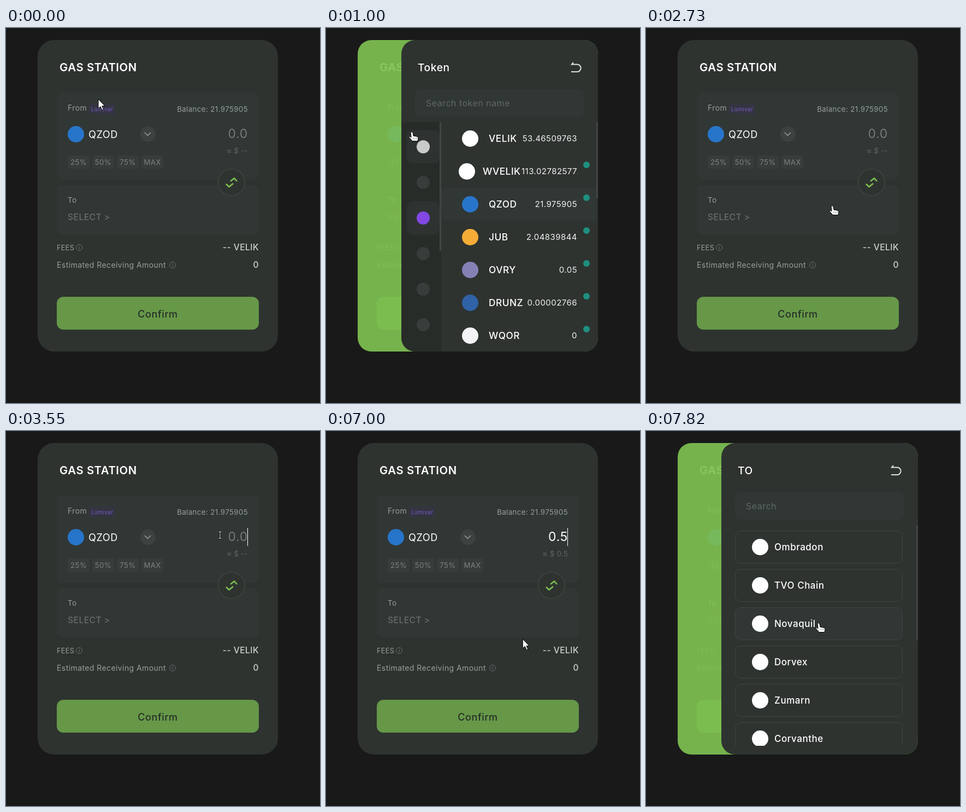
Recreate the animation shown at these times as an HTML page with a canvas. Size 575 px wide and 685 px high, loop 8 s.

```html
<!DOCTYPE html>
<html lang="en">
<head>
<meta charset="utf-8">
<title>Gas station</title>
<style>
html, body { margin: 0; width: 100%; height: 100%; overflow: hidden; background: #191919; }
canvas { display: block; }
</style>
</head>
<body>
<canvas id="stage" width="575" height="685"></canvas>
<script>
const ctx = document.getElementById('stage').getContext('2d');
const LOOP = 8000, FPMS = 11 / 1000, SLIDE = 540, PANEL_RADIUS = 25;
const CARD = '#2e3330', INNER = '#313735', LINE = '#3f4542', BAR = '#414644';
const MUTED = '#969f9b', DIM = '#666d6a', LIME = '#7fc150', WHITE = '#fff', BLUE = '#2775ca';

const tokens = [
  ['VELIK', '53.46509763', WHITE],
  ['WVELIK', '113.02782577', WHITE],
  ['QZOD', '21.975905', BLUE],
  ['JUB', '2.04839844', '#f5ac37'],
  ['OVRY', '0.05', '#8581b5'],
  ['DRUNZ', '0.00002766', '#2f62a6'],
  ['WQOR', '0', '#f4f4f6']
];
const chains = ['Ombradon', 'TVO Chain', 'Novaquil', 'Dorvex', 'Zumarn', 'Corvanthe'];

// Pointer stops: time, x, y
const stops = [
  [30, 169, 130], [450, 157, 190], [1120, 157, 190], [1820, 341, 325],
  [2950, 341, 325], [3180, 377, 200], [3280, 377, 200], [3360, 392, 190],
  [5860, 392, 190], [5909, 401, 206], [6270, 420, 419], [6560, 420, 419], [7360, 316, 351]
];
const caretOn = [[3540, 4080], [4170, 5080], [5540, 6080], [6610, 7140]];
const typing = [[4440, '0.5'], [4260, '0.'], [4170, '0']];

const clamp = v => Math.max(0, Math.min(1, v));
const inside = (x, y, l, t, r, b) => x >= l && x <= r && y >= t && y <= b;

// cubic-bezier(.25, .1, .25, 1)
function ease(v) {
  const x = clamp(v);
  const bez = (s, a, b) => 3 * s * (1 - s) ** 2 * a + 3 * s * s * (1 - s) * b + s ** 3;
  let lo = 0, hi = 1;
  for (let i = 0; i < 24; i++) {
    const mid = (lo + hi) / 2;
    if (bez(mid, .25, .25) < x) lo = mid; else hi = mid;
  }
  return bez(hi, .1, 1);
}

function box(x, y, w, h, r, fill, stroke) {
  ctx.beginPath();
  ctx.roundRect(x, y, w, h, r);
  if (fill) { ctx.fillStyle = fill; ctx.fill(); }
  if (stroke) { ctx.strokeStyle = stroke; ctx.lineWidth = 1; ctx.stroke(); }
}

function disc(x, y, r, fill) {
  ctx.beginPath();
  ctx.arc(x, y, r, 0, Math.PI * 2);
  ctx.fillStyle = fill;
  ctx.fill();
}

// y is the middle of the capital letters
function label(str, x, y, size, color, weight = 400, align = 'left') {
  ctx.font = `${weight} ${size}px Inter, sans-serif`;
  ctx.letterSpacing = size * .03 + 'px';
  ctx.textAlign = align;
  ctx.fillStyle = color;
  ctx.fillText(str, x, y + size * .364);
}

function tracePoly(points) {
  ctx.beginPath();
  points.forEach(([x, y]) => ctx.lineTo(x, y));
}

function line(points, color, width) {
  tracePoly(points);
  ctx.strokeStyle = color;
  ctx.lineWidth = width;
  ctx.stroke();
}

function info(x, y) {
  ctx.beginPath();
  ctx.arc(x, y, 5.5, 0, Math.PI * 2);
  ctx.strokeStyle = DIM;
  ctx.lineWidth = 1;
  ctx.stroke();
  line([[x, y - 1], [x, y + 3]], DIM, 1.2);
  line([[x, y - 3.2], [x, y - 2]], DIM, 1.2);
}

function drawForm(t) {
  box(58, 22, 440, 569, 30, CARD);
  label('GAS STATION', 98, 72, 20.3, WHITE, 600);

  box(93, 118, 370, 159, 10, INNER);
  label('From', 113, 146, 14, MUTED);
  box(152, 138, 48, 20, 4, '#343541');
  label('Lumivar', 176, 148, 10.2, '#7658c4', 400, 'center');
  label('Balance: 21.975905', 443, 148, 13.3, MUTED, 400, 'right');
  disc(128, 194, 15, BLUE);
  label('QZOD', 151, 194, 18.2, WHITE);
  disc(260, 194, 14, '#3d4240');
  line([[254, 191], [259.5, 196.5], [265, 191]], '#aab0ad', 1.2);
  ['25%', '50%', '75%', 'MAX'].forEach((s, i) => {
    box(113 + 45 * i, 233, 40, 24, 4, '#383d3c');
    label(s, 133 + 45 * i, 245, 13.2, '#7b8380', 400, 'center');
  });

  const typed = typing.find(([at]) => t >= at);
  const value = typed ? typed[1] : '';
  label(value || '0.0', 443, 193, 23, value ? WHITE : '#757875', 400, 'right');
  label('≈ $ ' + (value ? parseFloat(value) : '--'), 443, 224, 13, '#606764', 400, 'right');
  if (caretOn.some(([a, b]) => t >= a && t < b)) {
    ctx.fillStyle = WHITE;
    ctx.fillRect(442, 177, 1, 33);
  }

  box(93, 287, 370, 90, 10, INNER);
  label('To', 113, 314, 13.6, MUTED);
  label('SELECT >', 113, 345, 15.6, DIM, 500);

  disc(413, 282, 25, LINE);
  disc(413, 282, 23.5, CARD);
  line([[411, 280], [418, 274.5], [423, 280]], LIME, 2.6);
  line([[403, 285], [408.5, 290], [416, 284]], LIME, 2.6);

  label('FEES', 93, 401, 12.6, MUTED);
  info(134, 401);
  label('-- VELIK', 463, 400.5, 15.5, '#cdd5d1', 500, 'right');
  label('Estimated Receiving Amount', 93, 433, 14, MUTED);
  info(305, 433);
  label('0', 463, 432.5, 15.5, '#cdd5d1', 500, 'right');

  box(93, 491, 370, 60, 12, '#669848');
  label('Confirm', 278, 522, 18, '#262c27', 500, 'center');
}

function drawTokens(px, py) {
  box(138, 172, 73, 419, [0, 0, 0, PANEL_RADIUS], '#282c29');
  for (let i = 0; i < 6; i++) {
    const y = 217 + 65 * i;
    const hover = inside(px, py, 148, y - 30, 208, y + 30);
    const chosen = i === 2;
    if (hover || chosen) box(148, y - 30, 60, 60, 10, '#2e3331');
    disc(178, y, 12, chosen ? '#8247e5' : hover ? '#c9cbca' : '#383d3b');
  }
  box(208, 172, 3, 235, 0, BAR);

  box(211, 292, 284, 60, 0, INNER);
  tokens.forEach(([name, amount, color], i) => {
    const y = 202 + 60 * i, wide = name.length > 5;
    disc(wide ? 258 : 264, y, 15, color);
    label(name, wide ? 287 : 298, y, 17.3, WHITE, 500);
    label(amount, 460, y - .5, 15, '#f0f2f1', 400, 'right');
    if (i) disc(477, y - 12, 6, '#1f8f80');
  });
  box(495, 172, 3, 140, 0, BAR);
}

function drawChains(px, py) {
  ctx.save();
  ctx.beginPath();
  ctx.rect(138, 172, 360, 403);
  ctx.clip();
  chains.forEach((name, i) => {
    const y = 182 + 70 * i;
    const hover = inside(px, py, 163, y, 470, y + 60);
    box(163.5, y + .5, 306, 59, 10, hover ? INNER : null, LINE);
    disc(209, y + 30, 15, WHITE);
    label(name, 235, y + 30, 17, WHITE, 500);
  });
  ctx.restore();
  box(495, 172, 3, 210, 0, BAR);
}

function drawPanel(offset, title, hint, content, px, py) {
  if (offset >= SLIDE) return;
  ctx.save();
  ctx.translate(offset, 0);
  box(58, 22, 440, 569, PANEL_RADIUS, 'rgba(127,193,80,.9)');
  box(138, 22, 360, 569, PANEL_RADIUS, CARD);
  label(title, 168, 72, 19.2, WHITE, 500);
  ctx.beginPath();
  ctx.moveTo(453, 63);
  ctx.lineTo(450, 66.5);
  ctx.lineTo(460, 66.5);
  ctx.arc(460, 73.2, 6.7, -Math.PI / 2, Math.PI / 2);
  ctx.lineTo(449, 79.9);
  ctx.strokeStyle = '#dfe3e0';
  ctx.lineWidth = 2;
  ctx.stroke();
  box(163, 112, 310, 50, 10, INNER);
  label(hint, 183, 137, 16, '#5f6865');
  content(px - offset, py);
  ctx.restore();
}

function pointerAt(t) {
  const next = stops.findIndex(s => s[0] > t);
  if (next === 0) return stops[0].slice(1);
  if (next < 0) return stops[stops.length - 1].slice(1);
  const [ta, xa, ya] = stops[next - 1], [tb, xb, yb] = stops[next];
  const u = (t - ta) / (tb - ta), k = u * u * (3 - 2 * u);
  return [xa + (xb - xa) * k, ya + (yb - ya) * k];
}

const arrow = [[0, 0], [0, 17], [4, 13.5], [7, 20], [9.5, 19], [6.8, 12.5], [12, 12.5]];
const hand = [[-2, 1], [0, -.5], [2, 1], [3, 7], [11, 8.5], [12, 11], [11, 16.5],
  [1, 16.5], [-5, 9.5], [-3.5, 8], [-1, 10]];

function drawPointer(x, y, panelOpen) {
  const overInput = !panelOpen && inside(x, y, 348, 178, 443, 211);
  const clickable = panelOpen || inside(x, y, 113, 179, 274, 209) ||
    inside(x, y, 93, 287, 463, 377) || Math.hypot(x - 413, y - 282) < 25;
  ctx.save();
  ctx.translate(x, y);
  ctx.lineJoin = 'round';
  if (overInput) {
    for (const [color, width] of [['#000', 3], [WHITE, 1]]) {
      line([[0, -6], [0, 6]], color, width);
      line([[-2.5, -6], [2.5, -6]], color, width);
      line([[-2.5, 6], [2.5, 6]], color, width);
    }
  } else {
    tracePoly(clickable ? hand : arrow);
    ctx.closePath();
    ctx.fillStyle = WHITE;
    ctx.fill();
    ctx.strokeStyle = '#000';
    ctx.lineWidth = 1;
    ctx.stroke();
    if (clickable) [3, 6, 9].forEach(dx => line([[dx, 10], [dx, 13]], '#555', .7));
  }
  ctx.restore();
}

function draw(now) {
  const step = Math.min(87, Math.floor((now % LOOP + 6) * FPMS));
  const t = step / FPMS;
  const [px, py] = pointerAt(t);
  const tokenX = SLIDE * (1 - ease((t - 735) / 265) + ease((t - 2425.7) / 400));
  const chainX = SLIDE * (1 - ease((t - 7362) / 400));

  ctx.fillStyle = '#191919';
  ctx.fillRect(0, 0, 575, 685);
  drawForm(t);
  drawPanel(tokenX, 'Token', 'Search token name', drawTokens, px, py);
  drawPanel(chainX, 'TO', 'Search', drawChains, px, py);
  drawPointer(px, py, Math.min(tokenX, chainX) < SLIDE - 1);
}

const start = performance.now();
function tick() {
  draw(performance.now() - start);
  requestAnimationFrame(tick);
}
tick();
</script>
</body>
</html>
```
